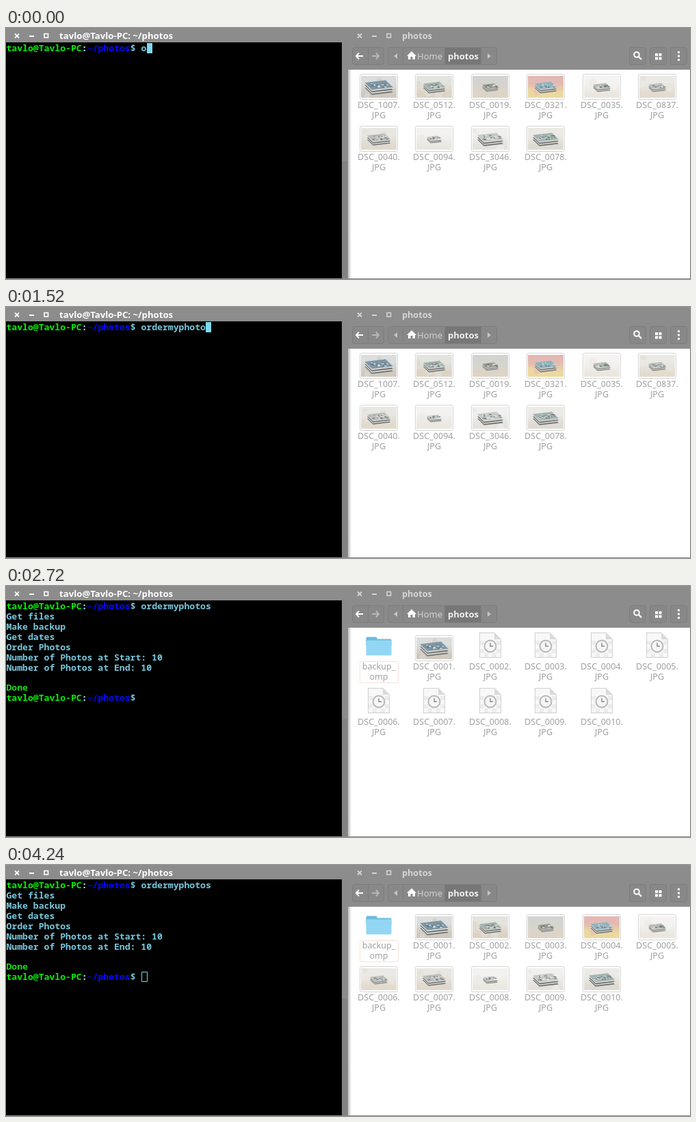
Write an HTML page with a canvas that moves like this. It is 1000 px wide and 367 px high and loops after 4880 ms.

```html
<!DOCTYPE html>
<html lang="en">
<head>
<meta charset="utf-8">
<title>Photo ordering</title>
<style>
html, body { margin: 0; width: 100%; height: 100%; overflow: hidden; background: #fff; }
canvas { display: block; width: 1000px; height: 367px; }
</style>
</head>
<body>
<canvas id="stage"></canvas>
<script>
const W = 1000, H = 367, LOOP = 4880, TICK = 80;
const canvas = document.getElementById('stage');
const dpr = window.devicePixelRatio || 1;
canvas.width = W * dpr;
canvas.height = H * dpr;
const c = canvas.getContext('2d');

const SANS = '"Noto Sans", "Open Sans", sans-serif';
const MONO = '"Noto Sans Mono", "DejaVu Sans Mono", monospace';
const CHAR = 7.88, LINE = 14.92;
const BAR = '#8c8c8c', EDGE = '#7d7d7d', FACE = '#888', WHITE = '#fff';
const CYAN = '#78c8dc', CURSOR = '#82d8ea', GREEN = '#00f500';

const USER = 'tavlo@Tavlo-PC', COMMAND = 'ordermyphotos';
const OUTPUT = [
  'Get files', 'Make backup', 'Get dates', 'Order Photos',
  'Number of Photos at Start: 10', 'Number of Photos at End: 10', '', 'Done'
];

// Milestones of the session, in ms
const TYPED = 1600, ENTER = 1760, REPORT = 1840, FINISHED = 2160, REORDER = 2240;
const LOAD = 2720, LOAD_STEP = 160, BLINK_ON = 3280, BLUR = 3600;

// File number, width of the subject, wall, floor, subject colour
const PHOTOS = [
  ['1007', 46, '#dcdedd', '#cfc8bd', '#7d97a6'],
  ['0512', 36, '#e4e4df', '#dcd3c4', '#a3b3ab'],
  ['0019', 26, '#d3d4d0', '#ded4c6', '#96988c'],
  ['0321', 36, '#e3b9b4', '#ecd9a0', '#8db4c0'],
  ['0035', 28, '#f4f3f1', '#ebe7e0', '#b4b8b2'],
  ['0837', 28, '#ebe9e5', '#e3dbcf', '#b9bcba'],
  ['0040', 38, '#e9e7e2', '#e1d9cd', '#b9bcb9'],
  ['0094', 24, '#f3f2f0', '#ebe7e1', '#c6c8c5'],
  ['3046', 42, '#f1f0ef', '#e5e2dd', '#c6c9c6'],
  ['0078', 42, '#ebeae5', '#dfdbd2', '#a3b3b1']
];

function rect(x, y, w, h, color) {
  c.fillStyle = color;
  c.fillRect(x, y, w, h);
}

function box(x, y, w, h, r, fill, stroke) {
  c.beginPath();
  c.roundRect(x + .5, y + .5, w - 1, h - 1, r);
  if (fill) { c.fillStyle = fill; c.fill(); }
  if (stroke) { c.strokeStyle = stroke; c.lineWidth = 1; c.stroke(); }
}

// Points are a flat list: x0, y0, x1, y1, ...
function trace(p) {
  c.beginPath();
  for (let i = 0; i < p.length; i += 2) c.lineTo(p[i], p[i + 1]);
}

function poly(color, ...p) {
  trace(p);
  c.fillStyle = color;
  c.fill();
}

function line(color, width, ...p) {
  trace(p);
  c.strokeStyle = color;
  c.lineWidth = width;
  c.stroke();
}

function disc(x, y, r, fill, stroke, width = 1) {
  c.beginPath();
  c.arc(x, y, r, 0, Math.PI * 2);
  if (fill) { c.fillStyle = fill; c.fill(); }
  if (stroke) { c.strokeStyle = stroke; c.lineWidth = width; c.stroke(); }
}

function fade(x0, y0, x1, y1, from, to) {
  const g = c.createLinearGradient(x0, y0, x1, y1);
  g.addColorStop(0, from);
  g.addColorStop(1, to);
  return g;
}

function text(s, x, y, font, color, align = 'left') {
  c.font = font;
  c.fillStyle = color;
  c.textAlign = align;
  c.fillText(s, x, y);
}

function random(seed) {
  return () => (seed = seed * 16807 % 2147483647) / 2147483647;
}

// A low skewed slab, as a ring of four corners
function slab(x, y, w, color) {
  const p = [];
  for (let k = 0; k < 4; k++) {
    const a = .45 + k * Math.PI / 2;
    p.push(x + Math.cos(a) * w / 2, y + Math.sin(a) * w * .17);
  }
  poly(color, ...p);
}

function photo(i) {
  const [, size, wall, floor, tone] = PHOTOS[i];
  const rnd = random(9001 * (i + 1));
  rect(0, 0, 52, 32, fade(0, 10, 0, 26, wall, floor));
  c.globalAlpha = .5;
  for (let k = 0; k < 6; k++) disc(rnd() * 52, rnd() * 32, 3 + rnd() * 4, k % 2 ? wall : floor);
  c.globalAlpha = 1;

  const thick = size * .16, layers = 4;
  for (let k = 0; k <= layers; k++)
    slab(26, 17 + thick * (1 - 2 * k / layers) / 2, size, k === layers ? tone : k % 2 ? '#d9d9d4' : '#6b6e6e');
  for (let k = 0; k < size / 2; k++) {
    const x = 26 + (rnd() - .5) * size * .6, y = 17 - thick / 2 + (rnd() - .5) * size * .16;
    rect(x, y, 1 + rnd() * 3, 1, k % 2 ? '#e9ebe8' : '#5c6a6e');
  }
}

function thumb(cx, y, i) {
  box(cx - 28, y, 56, 38, 2.5, WHITE, '#d4d4d4');
  c.save();
  c.translate(cx - 26, y + 3);
  c.beginPath();
  c.rect(0, 0, 52, 32);
  c.clip();
  photo(i);
  c.restore();
}

function placeholder(cx, y) {
  const l = cx - 16, r = cx + 16, b = y + 37, fold = 10;
  poly('#cfcfcf', l, y, r - fold, y, r, y + fold, r, b, l, b);
  poly('#f8f8f8', l + 1, y + 1, r - fold, y + 1, r - 1, y + fold, r - 1, b - 1, l + 1, b - 1);
  for (let k = 0; k < 20; k += 2)
    rect(l + 1 + k % 5 * 6, y + 12 + Math.floor(k / 5) * 6, 6, 6, '#ececec');
  poly('#dadada', r - fold, y, r - fold, y + fold, r, y + fold);
  disc(cx, y + 20, 8.5, '#f6f6f6', '#b8b8b8', 2);
  line('#888', 1.4, cx, y + 15, cx, y + 20, cx + 4, y + 20);
}

function folder(cx, y) {
  box(cx - 19, y, 17, 12, 2, '#69bddd');
  box(cx - 19, y + 3, 38, 12, 2, '#69bddd');
  box(cx - 19, y + 5, 38, 23, 1.5, '#93d6f3');
}

function label(a, b, cx, y) {
  const font = '12.6px ' + SANS;
  text(a, cx, y, font, '#a0a0a0', 'center');
  text(b, cx, y + 15, font, '#a0a0a0', 'center');
}

function files(t) {
  const reordered = t >= REORDER;
  const loaded = t < LOAD ? 0 : Math.floor((t - LOAD) / LOAD_STEP) + 1;
  const top = reordered ? 72 : 67;
  // Placeholders are taller than photos, so they push the second row down.
  const pitch = reordered && loaded < PHOTOS.length ? 81 : 76;

  if (reordered) {
    folder(545, 74);
    box(517, 110, 57, 32, 2, null, '#f5e2da');
    label('backup_', 'omp', 545, top + 50);
  }
  PHOTOS.forEach(([number], i) => {
    const slot = reordered ? i + 1 : i;
    const cx = Math.round(545 + slot % 6 * 81.4);
    const y = top + Math.floor(slot / 6) * pitch;
    if (!reordered || i < loaded) thumb(cx, y, i);
    else placeholder(cx, y - 4);
    const name = reordered ? String(slot).padStart(4, '0') : number;
    label(`DSC_${name}.`, 'JPG', cx, y + 50);
  });
}

function windowButtons(x, color) {
  for (const d of [-3, 3]) line(color, 1.8, x - d, 8.5, x + d, 14.5);
  rect(x + 18, 11, 7, 2, color);
  c.strokeStyle = color;
  c.lineWidth = 1.6;
  c.strokeRect(x + 40, 8.5, 5.5, 5.5);
}

function arrow(x, dir, color) {
  line(color, 2, x - 5 * dir, 41, x + 4 * dir, 41);
  line(color, 2, x + dir, 36.5, x + 5 * dir, 41, x + dir, 45.5);
}

function triangle(x, dir) {
  poly('#c6c6c6', x - 2.5 * dir, 37, x - 2.5 * dir, 45, x + 2.5 * dir, 41);
}

function home(x) {
  poly(WHITE, x - 7, 41, x, 34, x + 7, 41);
  rect(x - 5, 40, 10, 6, WHITE);
  rect(x - 1.5, 42, 3, 4, FACE);
}

function toolbar() {
  box(506, 28, 47, 26, 3, FACE, EDGE);
  arrow(517, -1, WHITE);
  arrow(540, 1, '#b8b8b8');

  box(558, 28, 160, 26, 3, FACE, EDGE);
  rect(641, 29, 53, 24, '#777');
  for (const x of [529, 580, 641, 694]) rect(x, 29, 1, 24, EDGE);
  triangle(569.5, -1);
  triangle(706.5, 1);
  home(593);
  text('Home', 601, 46, '13px ' + SANS, '#d2d2d2');
  text('photos', 646, 46, 'bold 13px ' + SANS, '#f0f0f0');

  for (let k = 0; k < 3; k++) box(911 + 30 * k, 28, 25, 26, 3, FACE, EDGE);
  disc(922, 39, 3.8, null, WHITE, 2);
  line(WHITE, 2.4, 925, 42, 929, 46);
  for (let k = 0; k < 4; k++) rect(949 + k % 2 * 5.5, 37 + (k >> 1) * 5.5, 4, 4, WHITE);
  for (let k = -1; k < 2; k++) disc(983.5, 41 + 5.5 * k, 1.7, WHITE);
}

function fileWindow(t) {
  rect(500, 0, 500, H, WHITE);
  rect(500, 61, 6, H, fade(500, 0, 505, 0, '#bbb', WHITE));
  rect(500, 0, 500, 61, BAR);
  windowButtons(517, '#d4d4d4');
  text('photos', 579, 16, 'bold 12.7px ' + SANS, '#d6d6d6');
  toolbar();
  files(t);
}

function mono(s, col, row, color) {
  text(s, .5 + col * CHAR, 34 + row * LINE, 'bold 13.13px ' + MONO, color);
}

function prompt(row) {
  mono(USER, 0, row, GREEN);
  mono(':', 14, row, '#b9e3ea');
  mono('~/photos', 15, row, '#0808ff');
  mono('$', 23, row, CYAN);
}

function cursor(col, row, hollow) {
  const x = Math.round(.8 + col * CHAR), y = Math.round(22 + row * LINE);
  if (hollow) box(x, y, 9, 15, 0, null, CURSOR);
  else rect(x, y, 8, 15, CURSOR);
}

// Typing starts slowly and doubles its pace for the last few keys.
function typedCount(t) {
  const slow = 1 + Math.floor(t / (2 * TICK));
  const fast = COMMAND.length + Math.floor((t - TYPED) / TICK);
  return Math.min(COMMAND.length, Math.max(slow, fast));
}

function outputCount(t) {
  if (t >= FINISHED) return OUTPUT.length;
  return Math.max(0, 1 + Math.floor((t - REPORT) / TICK));
}

function terminal(t) {
  rect(0, 0, 500, 21, BAR);
  windowButtons(16, WHITE);
  text(USER + ': ~/photos', 78, 16, 'bold 13.2px ' + SANS, WHITE);
  rect(0, 21, 491, 345, '#000');
  rect(491, 21, 9, 345, '#8b8b8b');
  rect(491, 195, 8, 171, '#828282');

  const typed = typedCount(t), shown = outputCount(t);
  prompt(0);
  mono(COMMAND.slice(0, typed), 25, 0, CYAN);
  OUTPUT.slice(0, shown).forEach((s, i) => mono(s, 0, i + 1, s === 'Done' ? '#18d818' : CYAN));

  if (t < ENTER) cursor(25 + typed, 0);
  else if (t < FINISHED) cursor(0, shown + 1);
  else {
    prompt(9);
    if (t < LOAD || t >= BLINK_ON) cursor(25, 9, t >= BLUR);
  }
}

function draw() {
  const t = performance.now() % LOOP;
  c.setTransform(dpr, 0, 0, dpr, 0, 0);
  fileWindow(t);
  terminal(t);
  rect(0, 366, W, 1, '#8a8a8a');
  requestAnimationFrame(draw);
}
draw();
</script>
</body>
</html>
```
